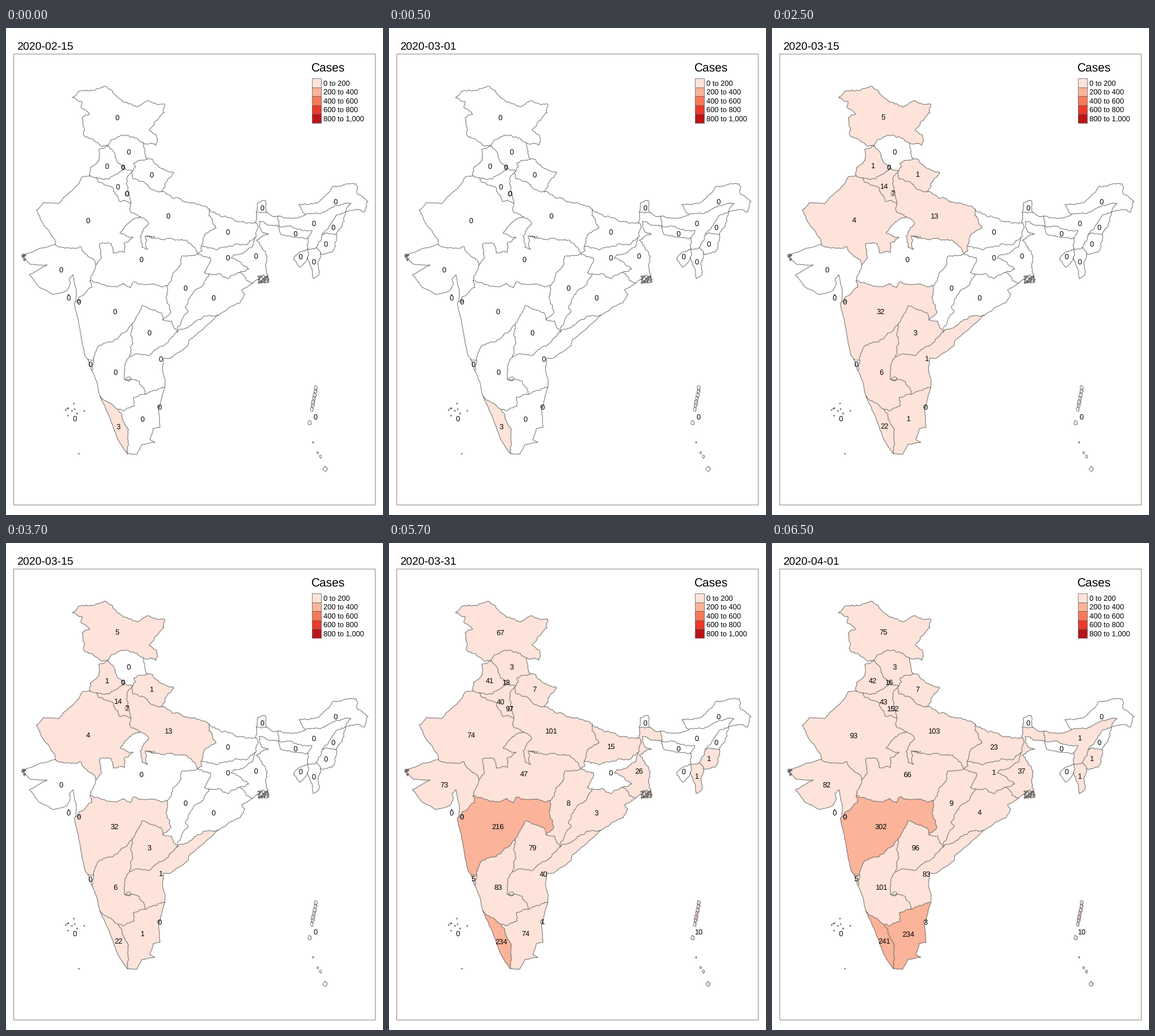
Animation, 658 px wide and 851 px high, one loop 8 s. Source, as a matplotlib script:

```python
import numpy as np
import matplotlib.pyplot as plt
from matplotlib.animation import FuncAnimation
from matplotlib.patches import Polygon, Rectangle

W, H, DPI = 658, 851, 64
PX = 72 / DPI
GREY = "#666666"
REDS = ["#FDE3D9", "#FBB399", "#F97859", "#EC392C", "#BB141A"]
# first 500 ms step, date, index of the counts
STAGES = [(0, "2020-02-15", 0), (1, "2020-03-01", 0), (5, "2020-03-15", 1),
          (9, "2020-03-31", 2), (13, "2020-04-01", 3)]
COAST = 0.16

plt.rcParams.update({"font.family": "Liberation Sans", "text.hinting": "none"})
fig = plt.figure(figsize=(W / DPI, H / DPI), dpi=DPI, facecolor="white")
ax = fig.add_axes([0, 0, 1, 1], xlim=(0, W), ylim=(H, 0))
ax.axis("off")
rng = np.random.default_rng(7)
arcs, rings, states = [], {}, {}

# Corners where borders meet
NODES = dict(
    a=(178, 206), c=(240, 201), d=(246, 229), e=(221, 250), f=(206, 245), g=(147, 258),
    h=(159, 262), i=(272, 286), j=(218, 306), k=(235, 330), l=(157, 414), m=(86, 378),
    n=(355, 317), o=(341, 381), q=(335, 394), r=(436, 340), s=(435, 366), t=(354, 430),
    u=(408, 427), v=(430, 446), w=(281, 450), x=(147, 441), y=(122, 478), z=(274, 510),
    A=(220, 518), B=(216, 574), C=(299, 531), D=(370, 502), E=(243, 640), F=(277, 628),
    G=(196, 667), H=(164, 643), I=(212, 744), J=(143, 579), K=(153, 580), L=(150, 598),
    M=(437, 322), N=(455, 322), O=(474, 329), P=(476, 346), Q=(523, 326), R=(592, 322),
    S=(552, 361), T=(576, 361), U=(542, 384), V=(549, 394), X=(527, 386), Y=(526, 401),
    Z=(527, 368))


def roughen(a, b, amount):
    """Midpoint displacement down to 3 px, without the end point."""
    d = b - a
    length = np.hypot(*d)
    if length < 3:
        return [a]
    shift = rng.uniform(-amount, amount) / np.sqrt(length)
    mid = (a + b) / 2 + shift * np.array([-d[1], d[0]])
    return roughen(a, mid, amount) + roughen(mid, b, amount)


def stroke(points, width=0.95):
    ax.plot(*np.transpose(points), color=GREY, lw=width * PX, zorder=2)


def arc(codes, ends, *key, rough=0.5):
    """Border between two corners through a few key points, shared by all codes."""
    start, stop = (NODES[name] for name in ends)
    points = np.array([start, *np.reshape(key, (-1, 2)), stop], float)
    line = [p for a, b in zip(points, points[1:]) for p in roughen(a, b, rough)]
    arcs.append((codes.split(), np.array(line + [points[-1]])))
    stroke(arcs[-1][1])


def island(code, x, y, rx, ry, n=12):
    t = np.linspace(0, 2 * np.pi, n, endpoint=False)
    r = rng.uniform(0.65, 1.15, n)
    points = np.column_stack([x + rx * r * np.cos(t), y + ry * r * np.sin(t)])
    rings.setdefault(code, []).append(points)
    stroke(np.vstack([points, points[:1]]), 0.9)


def creeks(x, y, w, h, n):
    """Dense, mostly upright inlets inside a box."""
    for _ in range(n):
        p = np.array([x, y]) + rng.random(2) * (w, h)
        stroke([p, p + rng.uniform((-1, -2), (1, 2)), p + rng.uniform((-1, -3), (1, 3))], 0.9)


def outline(code):
    """Join the arcs of a state end to end."""
    todo = [p for codes, p in arcs if code in codes]
    path = todo.pop(0)
    while todo:
        far = [min(np.hypot(*(p[e] - path[-1])) for e in (0, -1)) for p in todo]
        p = todo.pop(int(np.argmin(far)))
        path = np.vstack([path, p if np.allclose(p[0], path[-1]) else p[::-1]])
    return path


def label(x, y, text, size=12.8, ha="center"):
    return ax.text(x, y + 0.35 * size, text, size=size * PX, ha=ha, va="baseline", zorder=4)


def state(code, x, y, *counts):
    """Counts missing at the front are zero."""
    counts = (0,) * (4 - len(counts)) + counts
    layer = 1.5 if code in rings else 1
    patches = [ax.add_patch(Polygon(s, lw=0, zorder=layer))
               for s in rings.get(code) or [outline(code)]]
    states[code] = counts, patches, label(x, y, "")


# North
arc("JK", "ac", 166, 206, 138, 190, 133, 157, 146, 150, 131, 139, 133, 129, 116, 122, 129, 110,
    174, 102, 204, 128, 229, 138, 248, 127, 277, 133, 276, 148, 250, 178, 263, 188, 262, 205)
arc("JK HP", "ac", 186, 195, 203, 187, 229, 193)
arc("HP", "cd", 242, 211)
arc("PB HP", "af", 187, 215, 195, 236)
arc("HP HR", "fe", 212, 249)
arc("HP UK", "ed", 226, 243, 223, 236)
arc("UK", "di", 254, 229, 264, 239, 293, 253, 279, 270)
arc("UK UP", "ie", 251, 280, 241, 269, 222, 264)
arc("PB", "ag", 162, 212, 163, 228, 147, 245)
arc("PB RJ", "gh")
arc("PB HR", "hf", 179, 264, 197, 252)
arc("HR RJ", "hj", 161, 269, 186, 278, 198, 303, 208, 301)
arc("HR UP", "ej", 211, 262, 215, 290)
arc("RJ UP", "jk", 218, 322)
arc("RJ", "gm", 133, 260, 127, 272, 92, 307, 65, 305, 53, 318, 64, 341, 85, 369, rough=0.25)
arc("RJ GJ", "ml", 93, 383, 130, 382, 137, 393, 150, 402)
arc("RJ MP", "lk", 166, 403, 163, 378, 184, 377, 187, 393, 207, 392, 206, 376, 222, 366,
    199, 358, 219, 337)
arc("UP MP", "kq", 249, 341, 234, 364, 237, 383, 247, 387, 243, 363, 316, 371, 330, 384)
arc("UP JH", "qo", 342, 390)
arc("UP BR", "on", 346, 362, 367, 349, 354, 328)
arc("UP", "in", 290, 297, 320, 306)

# East
arc("BR", "nr", 375, 329, 404, 338)
arc("BR WB", "rs", 440, 350)
arc("BR JH", "os", 365, 387, 402, 377, 419, 379)
arc("JH CG", "qt", 357, 402, 346, 427)
arc("JH OD", "tu", 371, 429, 387, 438)
arc("JH WB", "su", 431, 382, 393, 402, 424, 421)
arc("OD WB", "uv", 419, 440)
arc("WB", "rM", 437, 330)
arc("SK WB", "MN")
arc("SK", "MN", 439, 305, 452, 301)
arc("WB", "NO", 462, 327)
arc("WB AS", "OP")
arc("WB", "Pv", 464, 345, 442, 338, 447, 357, 458, 361, 437, 371, 453, 392, 459, 444,
    440, 446, 441, 438)
arc("OD", "vD", 411, 458, 417, 465, 409, 480, 390, 488, rough=0.25)

# North-east
arc("AS", "OQ", 506, 332)
arc("AS AR", "QR", 556, 322, 574, 311, 602, 306)
arc("AR", "QR", 511, 309, 540, 306, 564, 287, 568, 279, 611, 272, 614, 291, 632, 303, 625, 322,
    612, 317)
arc("AS NL", "RS", 572, 334)
arc("NL", "RT", 590, 338)
arc("NL MN", "TS", 560, 358)
arc("MN", "TV", 569, 392)
arc("MN MZ", "VU")
arc("AS MN", "SU")
arc("AS MZ", "UX")
arc("MZ", "VY", 545, 420, 546, 431, 536, 438)
arc("MZ TR", "XY")
arc("TR", "YX", 512, 418, 502, 405, 505, 398, 516, 391)
arc("AS", "XZ")
arc("AS ML", "ZP", 534, 354, 498, 346)
arc("ML", "PZ", 480, 361)

# West and centre
arc("GJ", "my", 55, 387, 27, 397, 43, 413, 72, 414, 41, 431, 57, 452, 82, 466, 106, 459, 112, 448,
    110, 438, 117, 431, 122, 455, rough=COAST)
arc("GJ MP", "lx", 152, 428)
arc("GJ MH", "xy", 150, 453, 134, 468)
arc("MP MH", "xw", 165, 447, 187, 452, 205, 446, 217, 454, 222, 444, 267, 450)
arc("MP CG", "wq", 289, 440, 305, 413, 306, 400)
arc("MH CG", "wz", 281, 479, 288, 496)
arc("CG OD", "tC", 346, 446, 328, 460, 313, 487, 318, 496)
arc("CG TG", "zC", 289, 512)
arc("MH TG", "zA", 270, 497, 237, 486, 229, 502)

# South
arc("MH KA", "AK", 211, 530, 188, 547, 162, 556, 155, 570)
arc("MH GA", "KJ")
arc("GA KA", "KL")
arc("GA", "JL", 146, 588)
arc("MH", "yJ", 119, 481, 127, 518, 138, 573, rough=COAST)
arc("TG KA", "AB")
arc("TG AP", "CB", 281, 550, 250, 572)
arc("AP OD", "CD", 326, 517, 350, 503)
arc("AP", "DF", 320, 545, 318, 555, 287, 577, 275, 577, 273, 595, 278, 616, rough=COAST)
arc("AP KA", "BE", 207, 592, 206, 614, 233, 618)
arc("AP TN", "EF", 259, 633)
arc("KA TN", "EG", 222, 646, 224, 660, 206, 669)
arc("KA KL", "HG", 180, 655)
arc("KA", "LH", 159, 620, rough=COAST)
arc("KL TN", "GI", 203, 680, 214, 702, 213, 730)
arc("KL", "HI", 181, 681, 195, 719, rough=COAST)
arc("TN", "FI", 266, 668, 269, 698, 257, 700, 251, 719, 260, 724, 237, 728, 228, 745, rough=COAST)

# Enclaves and islands
island("CH", 204, 243, 2.5, 3)
island("DL", 211, 289, 4, 4.5)
island("DD", 127, 478, 2.5, 2.5)
island("DN", 109, 466, 1, 0.6)
island("PY", 266, 662, 2, 2.5)
island("enclave", 213, 613, 5, 4)
for step in np.linspace(0, 1, 7):
    island("AN", 541 - 7 * step, 629 + 37 * step, 2.8, 5)
for x, y, r in [(530, 690, 3), (536, 724, 1), (544, 742, 1.5), (549, 749, 2), (557, 771, 3.5)]:
    island("AN", x, y, r, 1.5 * r)
for _ in range(9):
    island("LD", *rng.normal((113, 671), (8, 9)), 0.9, 1.3, 6)
island("LD", 127, 744, 0.9, 1, 6)
creeks(440, 433, 18, 12, 80)
creeks(28, 396, 6, 9, 24)
creeks(245, 364, 14, 2, 10)

# Labels with counts
state("JK", 194, 156, 5, 67, 75)
state("HP", 214, 216, 3, 3)
state("PB", 176, 241, 1, 41, 42)
state("CH", 204, 243, 13, 16)
state("UK", 254, 256, 1, 7, 7)
state("HR", 195, 277, 14, 40, 43)
state("DL", 211, 289, 7, 97, 152)
state("RJ", 143, 336, 4, 74, 93)
state("UP", 283, 328, 13, 101, 103)
state("BR", 387, 356, 15, 23)
state("SK", 447, 314)
state("AR", 575, 303)
state("AS", 537, 341, 1)
state("NL", 571, 348)
state("ML", 505, 359)
state("MN", 558, 377, 1, 1)
state("TR", 514, 399)
state("MZ", 537, 408, 1, 1)
state("JH", 387, 401, 1)
state("WB", 436, 398, 26, 37)
state("MP", 236, 404, 47, 66)
state("GJ", 96, 422, 73, 82)
state("CG", 313, 454, 8, 9)
state("OD", 362, 471, 3, 4)
state("MH", 190, 495, 32, 216, 302)
state("TG", 250, 532, 3, 79, 96)
state("AP", 270, 578, 1, 40, 83)
state("KA", 191, 601, 6, 83, 101)
state("GA", 147, 587, 5, 5)
state("KL", 196, 696, 3, 22, 234, 241)
state("TN", 238, 683, 1, 74, 234)
state("PY", 268, 662, 1, 3)
state("AN", 540, 679, 10, 10)
state("LD", 120, 682)
state("DD", 127, 478)
state("DN", 109, 471)

# Frame, title and legend
ax.add_patch(Rectangle((13, 45), 631, 788, fill=False, ec=GREY, lw=0.8 * PX))
title = label(19.5, 31.3, "", 19.2, "left")
label(533, 69, "Cases", 20.8, "left")
for i, red in enumerate(REDS):
    y = 88 + 15.5 * i
    ax.add_patch(Rectangle((534, y), 15.5, 15.5, fc=red, ec=GREY, lw=0.8 * PX))
    label(553.5, y + 8, f"{200 * i} to {200 * i + 200:,}", 12.8, "left")


def update(step):
    _, date, column = [s for s in STAGES if s[0] <= step][-1]
    title.set_text(date)
    for counts, patches, text in states.values():
        n = counts[column]
        text.set_text(str(n))
        for patch in patches:
            patch.set_facecolor(REDS[n // 200] if n else "white")


anim = FuncAnimation(fig, update, frames=16, interval=500, repeat=True, repeat_delay=0,
                     init_func=lambda: update(0))
plt.show()
```
